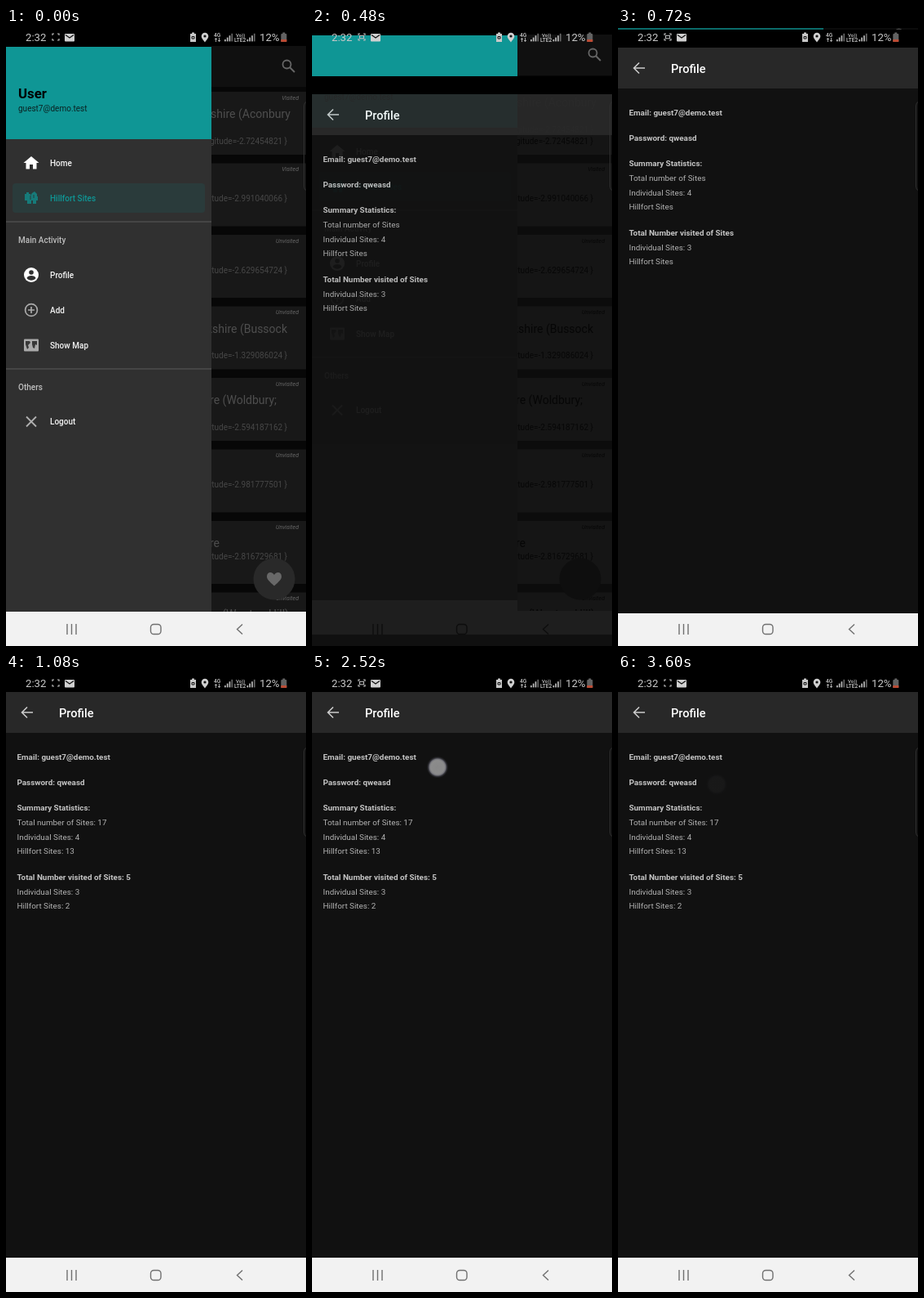
Recreate the animation shown at these times as an HTML page. Size 368 by 756 pixels, loop 3840 ms.

```html
<!DOCTYPE html>
<html lang="en">
<head>
<meta charset="utf-8">
<title>Profile screen</title>
<style>
html, body { margin: 0; width: 100%; height: 100%; overflow: hidden; background: #000; }
svg { display: block; width: 100%; height: 100%; font-family: Roboto, sans-serif; }
</style>
</head>
<body>
<svg id="stage" viewBox="0 0 368 756"></svg>
<script>
const LOOP = 3840, STEP = 120;
const TEAL = '#0f9695', MAIL = 'guest7@demo.test';
const SIDE = 252, NAV = 714;

const rect = (x, y, w, h, fill, extra = '') =>
  `<rect x="${x}" y="${y}" width="${w}" height="${h}" fill="${fill}" ${extra}/>`;
const text = (x, y, s, size, fill, extra = '') =>
  `<text x="${x}" y="${y}" font-size="${size}" fill="${fill}" ${extra}>${s}</text>`;
const line = (d, stroke, width, extra = '') =>
  `<path d="${d}" fill="none" stroke="${stroke}" stroke-width="${width}" ${extra}/>`;
const shape = (d, fill, extra = '') => `<path d="${d}" fill="${fill}" ${extra}/>`;
const MEDIUM = 'font-weight="500"', BOLD = 'font-weight="700"', END = 'text-anchor="end"';

// tag, longitude, longitude baseline, title, title end, title baseline
const sites = [
  ['Visited', '-2.72454821', 142, 'Herefordshire (Aconbury', 349, 110],
  ['Visited', '-2.991040066', 212],
  ['Unvisited', '-2.629654724', 300],
  ['Unvisited', '-1.329086024', 404, 'Berkshire (Bussock', 345, 373],
  ['Unvisited', '-2.594187162', 492, 'Herefordshire (Woldbury;', 332, 460],
  ['Unvisited', '-2.981777501', 562],
  ['Unvisited', '-2.816729681', 650, 'Herefordshire', 262, 635],
  ['Unvisited', '', 737, 'Shropshire (Wooton Hill)', 347, 722]
];

function list(gap, card, tagFill, titleFill, coordFill) {
  return rect(SIDE, 72, 116, NAV - 72, gap) + sites.map(([tag, lon, y, title, end, ty], i) => {
    const top = 78 + i * 87.5;
    return rect(240, top, 128, 77, card) +
      text(359, top + 9.5, tag, 7, tagFill, END + ' font-style="italic"') +
      (title ? text(end, ty, title, 14, titleFill, END) : '') +
      (lon ? text(345, y, `longitude=${lon} }`, 10, coordFill, END) : '');
  }).join('');
}

function menuItem(y, label, icon, fill = '#f4f4f4') {
  return `<g transform="translate(31 ${y})">${icon}</g>` + text(54, y + 3.6, label, 10, fill, MEDIUM);
}

const icons = {
  home: shape('M0-8L-9.5 0H-6.5V7.5H-2V2H2V7.5H6.5V0H9.5Z', '#fff'),
  fort: shape('M-8-5H-6V-7H-3V-5H-1V-3L1-6L4-8L7-5V-2H8V3H6V7H2V3H0V7H-5V3H-8Z', '#167b7a') +
    line('M-1-3V2M3-4V0', '#2a3b3b', 1),
  profile: '<circle r="9" fill="#fff"/><circle cy="-3" r="2.8" fill="#303030"/>' +
    shape('M-5.5 4C-5 0 5 0 5.5 4C3 7.5-3 7.5-5.5 4Z', '#303030'),
  add: '<circle r="7.4" fill="none" stroke="#aaa" stroke-width="1.7"/>' + line('M-4 0H4M0-4V4', '#aaa', 1.7),
  map: rect(-9, -7.5, 18, 15, '#aaa', 'rx="1"') +
    shape('M-7-5H-2L-1-3L-4 0L-3 3L-5 5L-7-1ZM1-5H7V0L5-1L4 4L2 3L1-1Z', '#383838'),
  close: line('M-6-6L6 6M6-6L-6 6', '#b0b0b0', 1.8)
};

const drawer = rect(0, 23, SIDE, NAV - 23, '#303030') + rect(0, 23, SIDE, 113, TEAL) +
  text(15, 86, 'User', 16.8, '#000', BOLD) + text(15, 101.5, MAIL, 10, '#0b2222') +
  rect(8, 190, 236, 36, '#2a3b3b', 'rx="4"') +
  rect(0, 236.5, SIDE, 1, '#5a5a5a') + rect(0, 416.5, SIDE, 1, '#5a5a5a') +
  text(15, 262.8, 'Main Activity', 10, '#bdbdbd', MEDIUM) + text(15, 442.6, 'Others', 10, '#bdbdbd', MEDIUM) +
  '<g clip-path="url(#row)"><circle id="ripple" fill="#565656"/></g>' +
  menuItem(165, 'Home', icons.home) + menuItem(208, 'Hillfort Sites', icons.fort, TEAL) +
  menuItem(302, 'Profile', icons.profile) + menuItem(345, 'Add', icons.add) +
  menuItem(388, 'Show Map', icons.map) + menuItem(481.5, 'Logout', icons.close);

const home = '<g clip-path="url(#side)">' + list('#070707', '#181818', '#666', '#4e4e4e', '#474747') +
  rect(SIDE, 22, 116, 50, '#101010') +
  '<circle cx="344.5" cy="44.5" r="5" fill="none" stroke="#666" stroke-width="1.8"/>' +
  line('M348 48L354 54', '#666', 2) +
  '<circle cx="329" cy="674" r="25.5" fill="#292929"/>' +
  shape('M329 682.5C323 677 320 674.5 320 671C320 665 326.5 664.5 329 669C331.5 664.5 338 665 338 671C338 674.5 335 677 329 682.5Z', '#686868') +
  '</g>' + drawer + rect(0, NAV, 368, 42, '#f2f2f2');

// baseline, label, late value, weight
const rows = [
  [104.6, 'Email: ' + MAIL, '', BOLD],
  [136, 'Password: qweasd', '', BOLD],
  [167.2, 'Summary Statistics:', '', BOLD],
  [185, 'Total number of Sites', ': 17'],
  [202.6, 'Individual Sites: 4', ''],
  [220.2, 'Hillfort Sites', ': 13'],
  [251.6, 'Total Number visited of Sites', ': 5', BOLD],
  [269.6, 'Individual Sites: 3', ''],
  [287.2, 'Hillfort Sites', ': 2']
];

const page = rect(0, 72, 368, 700, '#111') + rect(0, 22, 368, 50, '#282828') +
  line('M33 47H20M26 40.5L19.5 47L26 53.5', '#ccc', 1.6) +
  text(65, 52.6, 'Profile', 14.6, '#fff', MEDIUM) +
  rows.map(([y, label, late, weight = '']) =>
    text(13.5, y, `${label}<tspan class="late">${late}</tspan>`, 9.9, weight ? '#c4c4c4' : '#b2b2b2', weight)).join('');

const signal = x => [0, 1, 2, 3].map(i =>
  rect(x + i * 2.8, 14 - i * 2.4, 1.7, 2.4 + i * 2.4, i < 3 ? '#bbb' : '#666')).join('');

const status = text(24, 16.3, '2:32', 13.2, '#c8c8c8') +
  line('M59 7H57V9M63 7H65V9M57 13V15H59M65 13V15H63', '#bbb', 1.2) +
  `<g id="scan">${rect(58.5, 9.3, 5, 3.5, 'none', 'stroke="#bbb" stroke-width="1.1"')}</g>` +
  rect(72, 7, 12, 9.5, '#d0d0d0', 'rx="1"') + line('M73 8.5L78 12L83 8.5', '#111', 1.2) +
  shape('M226 7H228V5.5H231V7H233V17H226Z', '#c8c8c8') + line('M228 13V10.5H231V13Z', '#111', 1) +
  shape('M244 17.5C241 13.5 239.7 12 239.7 10A4.3 4.3 0 0 1 248.3 10C248.3 12 247 13.5 244 17.5Z', '#d0d0d0') +
  '<circle cx="244" cy="10" r="1.6" fill="#111"/>' +
  text(255, 10.5, '4G', 6.5, '#c8c8c8', MEDIUM) +
  line('M257.5 17V12.5M256 14L257.5 12.5L259 14M261.5 12V16.5M260 15L261.5 16.5L263 15', '#bbb', 0.9) +
  signal(268) + text(282, 10.5, 'Vo))', 6, '#c8c8c8', MEDIUM) + text(280, 17, 'LTE2', 6.5, '#c8c8c8', MEDIUM) +
  signal(295.5) + text(311, 16.3, '12%', 13.2, '#c8c8c8') +
  rect(339.3, 5.5, 3, 2, '#666') + rect(337.3, 7, 7, 10, '#626262', 'rx="1"') + rect(337.3, 14, 7, 3, '#bd4c35');

document.getElementById('stage').innerHTML = `<defs>
  <clipPath id="row">${rect(0, 280, SIDE, 43, '#000')}</clipPath>
  <clipPath id="side">${rect(SIDE, 22, 116, NAV - 22, '#000')}</clipPath>
  <clipPath id="under">${rect(SIDE, 131, 116, 582, '#000')}</clipPath>
  <radialGradient id="dot"><stop offset="0" stop-color="#888"/><stop offset=".62" stop-color="#8c8c8c"/>
    <stop offset=".74" stop-color="#74747a"/><stop offset=".84" stop-color="#3c3c44" stop-opacity=".8"/>
    <stop offset="1" stop-color="#222" stop-opacity="0"/></radialGradient>
  </defs>` + rect(0, 0, 368, 756, '#000') +
  `<g id="home">${home}</g>
  <g id="profile">${rect(0, 0, 368, 22, '#000')}<g id="page">${page}</g></g>
  <g id="ghost" clip-path="url(#under)">${list('#0c0c0c', '#161616', '#060606', '#060606', '#070707')}
    <circle cx="329" cy="674" r="25.5" fill="#0e0e0e"/></g>` +
  rect(0, NAV, 368, 60, '#f2f2f2', 'id="bar"') +
  `<g id="keys" fill="none" stroke-width="1.4"><path d="M75 729V742M80.5 729V742M86 729V742M290 729.5L283.5 735.5L290 741.5"/>
    <rect x="177.5" y="729.5" width="12.5" height="12" rx="3.8"/></g>` +
  line('M369 90Q365.5 91 365.5 95V194Q365.5 198 369 199', '#303030', 1) +
  status + '<circle id="touch" r="13.5" fill="url(#dot)"/>';

const el = {};
for (const id of ['home', 'profile', 'page', 'ghost', 'bar', 'keys', 'ripple', 'scan', 'touch']) {
  el[id] = document.getElementById(id);
}
const late = document.querySelectorAll('.late');
const set = (node, attrs) => { for (const k in attrs) node.setAttribute(k, attrs[k]); };
const show = (node, on) => { node.style.display = on ? '' : 'none'; };
const within = (t, a, b) => t >= a && t < b;

// time, x, y, opacity
const press = [[120, 51, 302, .45], [240, 51, 302, .85], [360, 51, 302, .95]];
const swipe = [
  [1800, 262, 130, .5], [1920, 215, 190, 1], [2040, 150, 225, 1], [2160, 130, 170, 1],
  [2280, 180, 130, 1], [2400, 180, 130, 1], [2520, 154, 114, 1], [2640, 225, 140, 1],
  [2760, 250, 200, 1], [2880, 190, 230, 1], [3000, 140, 170, 1], [3120, 134, 138, 1],
  [3240, 128, 136, 1], [3360, 121, 135, .65], [3480, 121, 135, .3], [3600, 121, 135, .06]
];

function along(path, t) {
  const n = path.findIndex(p => p[0] >= t);
  if (n < 0) return path[path.length - 1];
  if (n === 0) return path[0];
  const a = path[n - 1], b = path[n], k = (t - a[0]) / (b[0] - a[0]);
  return a.map((v, i) => v + (b[i] - v) * k);
}

function draw(ms) {
  const t = Math.floor(ms % LOOP / STEP) * STEP;
  const n = (t - 480) / STEP;
  const opened = n >= 0, entering = n === 0;
  const slide = opened ? Math.round(59 * Math.pow(.2, n)) : 0;

  // the old screen drifts up and dims while the new one slides in over it
  show(el.home, n < 3);
  set(el.home, {
    transform: `translate(0 ${opened ? -14 - 12 * n : 0})`,
    opacity: opened ? 1 - .15 * n : 1
  });
  show(el.profile, opened);
  set(el.profile, { transform: `translate(0 ${slide})` });
  set(el.page, { opacity: entering ? .94 : 1 });
  show(el.ghost, within(n, 0, 2));
  set(el.ghost, { opacity: entering ? .95 : .8 });
  late.forEach(node => show(node, n >= 3));

  show(el.bar, !entering);
  set(el.bar, { y: NAV + slide });
  set(el.keys, { stroke: entering ? '#0d0d0d' : '#707070' });

  // the ripple grows while its centre drifts to the middle of the row
  const grow = Math.min(1, Math.max(0, (t - 120) / 240));
  set(el.ripple, { cx: 51 + 41 * grow, cy: 302, r: 94 * grow });
  show(el.ripple, within(t, 240, 480));

  show(el.scan, within(t, 480, 1080) || within(t, 1440, 1980) || within(t, 2520, 3120));

  const path = within(t, 120, 480) ? press : t >= 1800 ? swipe : null;
  show(el.touch, path);
  if (path) {
    const [, x, y, opacity] = along(path, t);
    set(el.touch, { cx: x, cy: y, opacity });
  }
}

const start = performance.now();
function tick() {
  draw(performance.now() - start);
  requestAnimationFrame(tick);
}
tick();
</script>
</body>
</html>
```
